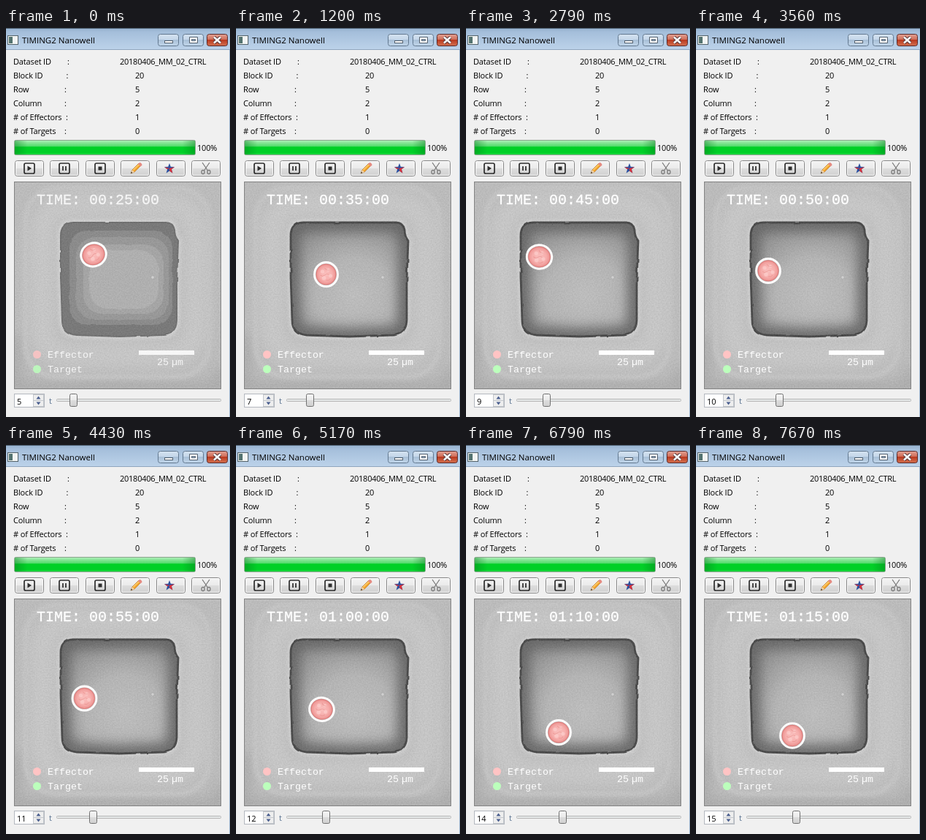
Write an HTML page that moves like this. It is 307 px wide and 532 px high and loops after 8 s.

```html
<!DOCTYPE html>
<html lang="en">
<head>
<meta charset="utf-8">
<title>TIMING2 Nanowell</title>
<style>
html, body { margin: 0; width: 100%; height: 100%; overflow: hidden; background: #f0f0f0; }
svg { display: block; width: 307px; height: 532px; }
text { font: 11px "Open Sans", "Noto Sans", sans-serif; fill: #000; }
.mono text { font-family: "Liberation Mono", monospace; font-size: 13.3px; fill: #fff; }
.mono .clock { font-size: 20px; stroke: #fff; stroke-width: .3; }
.button { fill: url(#buttonFill); stroke: #858585; }
.glyph { fill: none; stroke: #2c2c2c; stroke-width: 1.7; }
.solid { fill: #2c2c2c; stroke: none; }
</style>
</head>
<body>
<svg viewBox="0 0 307 532" xmlns="http://www.w3.org/2000/svg">
<defs>
  <linearGradient id="titleFill" x2="0" y2="1">
    <stop stop-color="#96b2cf"/><stop offset=".2" stop-color="#a5bfdb"/><stop offset="1" stop-color="#bdd3ea"/>
  </linearGradient>
  <linearGradient id="captionFill" x2="0" y2="1">
    <stop stop-color="#d5e3f1"/><stop offset=".48" stop-color="#c4d6e9"/><stop offset=".5" stop-color="#a9c0d8"/><stop offset="1" stop-color="#c1d6ea"/>
  </linearGradient>
  <linearGradient id="closeFill" x2="0" y2="1">
    <stop stop-color="#e2a294"/><stop offset=".48" stop-color="#cf6a55"/><stop offset=".5" stop-color="#b93a20"/><stop offset="1" stop-color="#d4714f"/>
  </linearGradient>
  <linearGradient id="buttonFill" x2="0" y2="1">
    <stop stop-color="#f4f4f4"/><stop offset=".48" stop-color="#ebebeb"/><stop offset=".5" stop-color="#dddddd"/><stop offset="1" stop-color="#d0d0d0"/>
  </linearGradient>
  <linearGradient id="barFill" x2="0" y2="1">
    <stop stop-color="#b4efbe"/><stop offset=".15" stop-color="#8ee79d"/><stop offset=".42" stop-color="#4fdb69"/>
    <stop offset=".46" stop-color="#00d027"/><stop offset=".85" stop-color="#00d027"/><stop offset="1" stop-color="#2bdc4c"/>
  </linearGradient>
  <linearGradient id="barEnds">
    <stop stop-color="#067d1c" stop-opacity=".45"/><stop offset=".07" stop-color="#067d1c" stop-opacity="0"/>
    <stop offset=".93" stop-color="#067d1c" stop-opacity="0"/><stop offset="1" stop-color="#067d1c" stop-opacity=".45"/>
  </linearGradient>
  <radialGradient id="wellFill" cx=".54" cy=".64" r=".72">
    <stop stop-color="#bebebe"/><stop offset=".45" stop-color="#b4b4b4"/><stop offset="1" stop-color="#868686"/>
  </radialGradient>
  <radialGradient id="cellFill">
    <stop stop-color="#fac0be"/><stop offset=".65" stop-color="#f6aeac"/><stop offset="1" stop-color="#ec9290"/>
  </radialGradient>
  <filter id="soft" x="-30%" y="-30%" width="160%" height="160%"><feGaussianBlur stdDeviation="9"/></filter>
  <filter id="mist" x="-30%" y="-30%" width="160%" height="160%"><feGaussianBlur stdDeviation="2.5"/></filter>
  <filter id="wobble" x="-10%" y="-10%" width="120%" height="120%">
    <feTurbulence type="fractalNoise" baseFrequency=".08" numOctaves="1" seed="4"/>
    <feDisplacementMap in="SourceGraphic" scale="3" xChannelSelector="R" yChannelSelector="G"/>
    <feGaussianBlur stdDeviation=".5"/>
  </filter>
  <filter id="grain" x="0" y="0" width="100%" height="100%" color-interpolation-filters="sRGB">
    <feTurbulence id="noise" type="fractalNoise" baseFrequency=".55" numOctaves="2" seed="5"/>
    <feColorMatrix values="1 0 0 0 .2  1 0 0 0 .2  1 0 0 0 .2  0 0 0 0 .1"/>
  </filter>
  <path id="well" d="M92 266 L151 266 L219 266 Q229 266 231 276 Q231 285 236 291 L234 345 L234 400 Q233 419 215 420 L155 422 L97 420 Q77 418 77 400 L75 340 L75 284 Q75 267 92 266Z"/>
  <clipPath id="wellClip"><use href="#well"/></clipPath>
  <clipPath id="viewClip"><rect x="12" y="211" width="282" height="282"/></clipPath>
</defs>

<rect width="307" height="532" fill="#f0f0f0"/>
<path d="M306.500 30V532" stroke="#a3bad3"/>
<g id="titleBar">
  <rect width="307" height="30" fill="url(#titleFill)"/>
  <path d="M0 .5H307" stroke="#4a5b6c"/><path d="M0 29.5H307" stroke="#8fa6be"/>
  <rect x="2.500" y="10.500" width="14" height="12" fill="#f2f5f3" stroke="#53636a"/>
  <rect x="4" y="12" width="5" height="9" fill="#53736f"/>
  <text x="22" y="21" style="font-size:11.5px">TIMING2 Nanowell</text>
  <g stroke="#62788f" fill="url(#captionFill)">
    <rect x="208.500" y="8.500" width="28" height="16" rx="3"/>
    <rect x="242.500" y="8.500" width="28" height="16" rx="3"/>
    <rect x="275.500" y="8.500" width="28" height="16" rx="3" fill="url(#closeFill)" stroke="#5b2a2a"/>
  </g>
  <g fill="#fff" stroke="#53606e">
    <rect x="217.500" y="17.500" width="11" height="3"/>
    <path fill-rule="evenodd" d="M251.500 12.500h11v8h-11zM254.500 15.500h5v2h-5z"/>
  </g>
  <path d="M285 12.500l9 8m0-8l-9 8" stroke="#54393c" stroke-width="4.500"/>
  <path d="M285 12.500l9 8m0-8l-9 8" stroke="#fff" stroke-width="2.500"/>
</g>
<g id="info"></g>
<g id="progress">
  <rect x="11.500" y="153.500" width="248" height="20" rx="2" fill="url(#barFill)" stroke="#8aa68d"/>
  <rect x="12" y="154" width="247" height="19" fill="url(#barEnds)"/>
  <text x="262" y="168" letter-spacing="-.2">100%</text>
</g>
<g id="buttons"></g>
<g class="glyph">
  <rect x="25" y="185" width="14" height="14" rx="2"/><path class="solid" d="M29.500 188.500l5.500 3.500-5.500 3.500z"/>
  <rect x="73" y="185" width="14" height="14" rx="2"/><path d="M78 189v6m4-6v6"/>
  <rect x="122" y="185" width="14" height="14" rx="2"/><path class="solid" d="M126.500 189.500h5v5h-5z"/>
</g>
<g id="pencil">
  <path d="M171 199l2-5 9-9 3 3-9 9z" fill="#f4a62c" stroke="#b8752a" stroke-width=".7"/>
  <path d="M174.500 194l8-7.500" stroke="#ffd47a" stroke-width="1.200"/>
  <path d="M181 186l2-2q3 0 3.500 3.500l-2 2z" fill="#e58a82"/>
  <path d="M171 199l2-5 3 3z" fill="#f0d6ae"/><path d="M171 199l.8-2.500 1.600 1.600z" fill="#333"/>
</g>
<g id="star" transform="translate(224 192) scale(.88)">
  <path d="M0-8l2 5.500 6 .3L3.300 1.500 5 7.500 0 4z" fill="#2b4f9e"/>
  <path d="M0-8l-2 5.500-6 .3 4.700 3.700L-5 7.500 0 4z" fill="#2b4f9e"/>
  <path d="M0 0L8-2.200 3.300 1.500 5 7.500 0 4zM0 0L-8-2.200-3.300 1.500z" fill="#d3333d"/>
</g>
<g id="scissors" fill="none" stroke="#777" stroke-width="1.200">
  <path d="M269 184l7.500 11m2.500-11l-7.500 11"/>
  <ellipse cx="270" cy="197" rx="2" ry="2.600"/><ellipse cx="278" cy="197" rx="2" ry="2.600"/>
</g>

<g id="view" clip-path="url(#viewClip)">
  <rect x="11" y="210" width="285" height="284" fill="#bcbcbc"/>
  <g fill="none" filter="url(#soft)">
    <rect x="50" y="242" width="210" height="205" rx="35" stroke="#c8c8c8" stroke-width="36"/>
    <path d="M12 420V493H294V465" stroke="#a6a6a6" stroke-width="14"/>
  </g>
  <rect x="27" y="219" width="251" height="258" rx="42" fill="none" stroke="#c6c6c6" stroke-width="6" filter="url(#mist)"/>
  <use href="#well" fill="none" stroke="#d2d2d2" stroke-width="9" filter="url(#mist)"/>
  <g id="smoothWell">
    <use href="#well" fill="url(#wellFill)"/>
    <g clip-path="url(#wellClip)">
      <use href="#well" fill="none" stroke="#5c5c5c" stroke-width="22" filter="url(#soft)"/>
    </g>
    <use href="#well" fill="none" stroke="#404040" stroke-width="2.800" filter="url(#wobble)"/>
  </g>
  <g id="bandedWell" filter="url(#wobble)">
    <use href="#well" fill="#737373" stroke="#696969" stroke-width="2"/>
    <rect x="87" y="277" width="141" height="129" rx="24" fill="#878787"/>
    <rect x="96" y="286" width="127" height="113" rx="26" fill="#959595"/>
    <rect x="106" y="296" width="110" height="95" rx="26" fill="#a3a3a3"/>
    <rect x="114" y="304" width="95" height="80" rx="26" fill="#afafaf"/>
  </g>
  <rect x="11" y="210" width="285" height="284" filter="url(#grain)"/>
  <circle cx="201" cy="341" r="2.300" fill="#d0d0d0" stroke="#a8a8a8" stroke-width=".8"/>
  <g id="cell">
    <ellipse id="ring" fill="#c9b9b9" stroke="#fff" stroke-width="2.800"/>
    <ellipse id="body" fill="url(#cellFill)" stroke="#e07a78"/>
    <g fill="#ffdad8" opacity=".5">
      <circle cx="-5" cy="-4" r="2.600"/><circle cx="3" cy="-6" r="2.200"/><circle cx="6" cy="2" r="2.500"/>
      <circle cx="-3" cy="5" r="2.800"/>
    </g>
    <path d="M-8 1q3 3 6 0t6-1M-2-9q2 4 7 3M0 8q4 1 6-2" fill="none" stroke="#dc7572" opacity=".4"/>
  </g>
  <g class="mono" id="overlay">
    <text class="clock" id="clock" x="42" y="241"></text>
    <circle cx="42.500" cy="446.500" r="5.500" fill="#ffc4c4"/><text x="57" y="451">Effector</text>
    <circle cx="42.500" cy="466.500" r="5.500" fill="#bcffbc"/><text x="57" y="471">Target</text>
    <rect x="182" y="441" width="76" height="6" fill="#fff"/>
    <text x="207" y="461">25</text><text x="227" y="461">µm</text>
  </g>
</g>
<rect x="11.500" y="210.500" width="283" height="283" fill="none" stroke="#828282"/>

<g id="spinner">
  <rect x="11.500" y="500.500" width="41" height="18" fill="#fff" stroke="#b4b8bf"/>
  <g fill="#eee" stroke="#c3c7cc"><rect x="37.500" y="501.500" width="14" height="8"/><rect x="37.500" y="509.500" width="14" height="8"/></g>
  <path d="M41.500 507.500l3-4 3 4zM41.500 511.500l3 4 3-4z" fill="#4b5f8f"/>
  <text id="step" x="15" y="515"></text>
  <text x="59" y="514" style="fill:#58708f">t</text>
</g>
<rect x="69.500" y="507.500" width="225" height="3" rx="1" fill="#e7eaea" stroke="#b5b5b5"/>
<rect id="handle" x="-5" y="500.500" width="10" height="17" rx="2" fill="url(#buttonFill)" stroke="#707070"/>
</svg>
<script>
const el = id => document.getElementById(id);
const set = (id, attrs) => Object.entries(attrs).forEach(([k, v]) => el(id).setAttribute(k, v));

const rows = [
  ["Dataset ID", 84, "20180406_MM_02_CTRL", 156],
  ["Block ID", 82.5, "20", 177],
  ["Row", 80, "5", 177],
  ["Column", 80, "2", 177],
  ["# of Effectors", 82, "1", 177],
  ["# of Targets", 80, "0", 177]
];
el("info").innerHTML = rows.map(([label, colonX, value, x], i) => {
  const y = 50 + i * 19;
  return `<text x="10" y="${y}" letter-spacing="-.15">${label}</text><text x="${colonX}" y="${y}">:</text>` +
    `<text x="${x}" y="${y}" letter-spacing="-.25">${value}</text>`;
}).join("");

el("buttons").innerHTML = Array.from({ length: 6 }, (_, i) => {
  const x = Math.round(12 + i * 48.4) + .5;
  return `<rect class="button" x="${x}" y="181.5" width="39" height="21" rx="3"/>` +
    `<rect x="${x + 1}" y="182.5" width="37" height="19" rx="2" fill="none" stroke="#fafafa"/>`;
}).join("");

// start time, cell centre, ring radii, tilt
const poses = [
  [0, 120, 310, 17.5, 16, -20],
  [430, 124, 326, 16.3, 16.3, 0],
  [1200, 123.5, 337, 16, 16.5, 0],
  [1920, 113.5, 327, 16.3, 16.3, 0],
  [2790, 100.5, 313, 17.3, 16.3, 10],
  [3560, 99, 332, 16.5, 16.5, 0],
  [4430, 107.5, 346.5, 16.5, 16.5, 0],
  [5170, 117.5, 361.5, 17, 16, 15],
  [6040, 122, 384.5, 16.3, 16.8, 0],
  [6790, 127, 393, 16.5, 16.5, 0],
  [7670, 132, 397.5, 16.5, 16.8, 0]
];
const firstStep = 5, loop = 8000;
const pad = n => String(n).padStart(2, "0");
let shown = -1;

function show(i) {
  const [, x, y, rx, ry, tilt] = poses[i];
  const step = firstStep + i, minutes = step * 5;
  set("cell", { transform: `translate(${x} ${y}) rotate(${tilt})` });
  set("ring", { rx, ry });
  set("body", { rx: rx - 2.5, ry: ry - 2.5 });
  set("handle", { transform: `translate(${Math.floor(92 + i * 4.5) + .5} 0)` });
  set("noise", { seed: step });
  set("smoothWell", { visibility: i ? "visible" : "hidden" });
  set("bandedWell", { visibility: i ? "hidden" : "visible" });
  set("overlay", { opacity: i ? 1 : .85 });
  el("step").textContent = step;
  el("clock").textContent = `TIME: ${pad(Math.floor(minutes / 60))}:${pad(minutes % 60)}:00`;
}

const start = performance.now();
function tick() {
  const t = (performance.now() - start) % loop;
  const i = poses.filter(p => p[0] <= t).length - 1;
  if (i !== shown) show(shown = i);
  requestAnimationFrame(tick);
}
tick();
</script>
</body>
</html>
```
